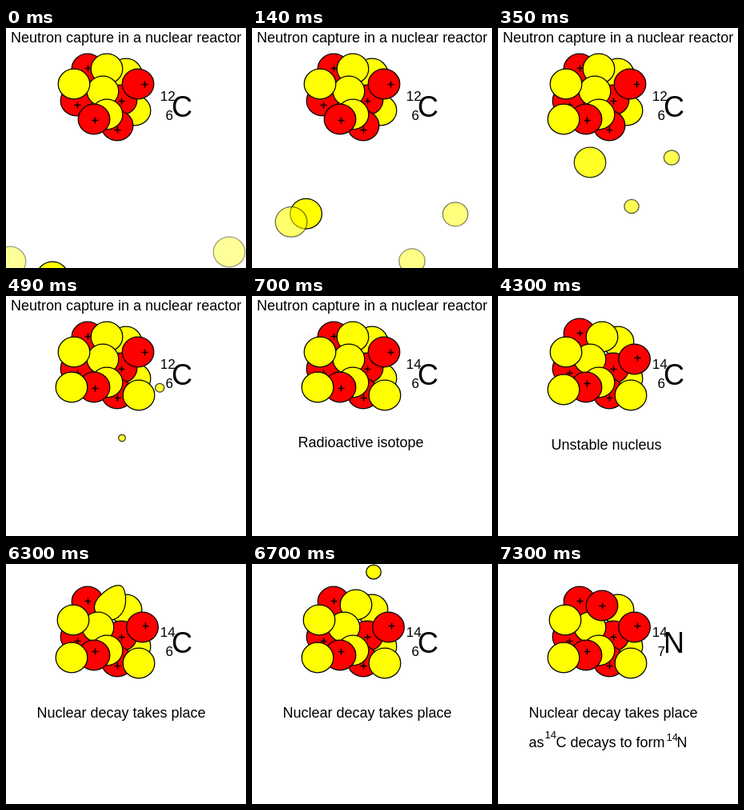
An HTML page with a canvas that plays this animation: 300x300 px, repeating every 8000 ms.

```html
<!DOCTYPE html>
<html lang="en">
<head>
<meta charset="utf-8">
<title>Neutron capture</title>
<style>
html, body { margin: 0; width: 100%; height: 100%; overflow: hidden; background: #fff; }
canvas { display: block; width: 300px; height: 300px; }
</style>
</head>
<body>
<canvas id="stage" width="300" height="300"></canvas>
<script>
const ctx = document.getElementById('stage').getContext('2d');
const LOOP = 8000, STEP = 70;
const RED = '#f00', YELLOW = '#ff0';
const FONT = '"Liberation Sans", Arial, sans-serif';

// Back to front: x, y and, for protons, the place of the plus sign.
const calm = {
  p1: [102, 51, 102, 50],
  n1: [150, 57],
  p2: [88, 91, 89, 96],
  n2: [161, 103],
  p3: [144, 90, 144, 91],
  p4: [139, 122, 139, 127],
  n5: [126, 51],
  n3: [121, 79],
  n4: [126, 108],
  p5: [110, 114, 111, 115],
  n6: [85, 70],
  p6: [165, 70, 173, 70],
  left: [82, 114],
  right: [166, 124]
};
const unstable = {
  ...calm,
  p1: [102, 47, 102, 46],
  n3: [115, 79],
  p5: [110, 114, 111, 109],
  n5: [130, 51],
  p6: [170.5, 79, 174, 77],
  left: [82, 117]
};
const shakeA = { ...unstable, p1: [102, 50, 102, 49], n3: [118, 79], left: [80, 115], right: [166, 121] };
const shakeB = { ...unstable, n5: [127, 50], p6: [168, 75, 173, 74], left: [81, 113], right: [165, 122] };
const decaying = { ...unstable, n6: [84, 70] };
const shakeC = { ...decaying, p6: [169, 77, 173, 75], left: [81, 116], right: [165, 122] };

function ball(x, y, color, scale = 1, alpha = 1) {
  if (scale <= 0.02 || alpha <= 0) return;
  ctx.globalAlpha = alpha;
  ctx.beginPath();
  ctx.ellipse(x, y, 19.8 * scale, 18.8 * scale, 0, 0, Math.PI * 2);
  paint(color);
  ctx.globalAlpha = 1;
}

function paint(color) {
  ctx.fillStyle = color;
  ctx.fill();
  ctx.strokeStyle = '#000';
  ctx.lineWidth = 1.25;
  ctx.stroke();
}

function proton(x, y, px = x, py = y) {
  ball(x, y, RED);
  ctx.fillStyle = '#000';
  ctx.fillRect(px - 3.5, py - 0.25, 8, 1.5);
  ctx.fillRect(px - 0.25, py - 3.5, 1.5, 8);
}

// A neutron pulled out towards the upper right.
function bulge(pull) {
  const x = 141 + pull, y = 26.6 - pull;
  ctx.beginPath();
  ctx.moveTo(110.5, 53);
  ctx.bezierCurveTo(111, 42, 130, 26.6 - pull, x, y);
  ctx.bezierCurveTo(x + 7, y, 150, 38, 149.5, 47);
  ctx.bezierCurveTo(149, 60, 140, 70, 130, 70);
  ctx.bezierCurveTo(118, 70, 110, 63, 110.5, 53);
  ctx.closePath();
  paint(YELLOW);
}

function text(str, x, y, size = 18) {
  ctx.font = size + 'px ' + FONT;
  ctx.fillStyle = '#000';
  ctx.fillText(str, x, y);
}

function symbol(mass, number, letter) {
  text(mass, 192.7, 91, 17);
  text(number, 199.5, 114.5, 17);
  text(letter, 207, 111, 36);
}

function nucleus(pose, t) {
  const changed = t >= 6900;
  for (const [name, spot] of Object.entries(pose)) {
    if (t < 700 && (name === 'left' || name === 'right')) continue;
    if (name === 'n5' && changed) continue;
    if (name === 'n5' && t >= 6300 && t < 6700) bulge(t < 6500 ? 0 : 4);
    else if (name[0] === 'p') proton(...spot);
    else ball(spot[0], spot[1], YELLOW);
  }
  if (changed) proton(130, 52);
}

// Straight flight between [x, y, scale, alpha] points, k beyond 1 runs on.
function fly(a, b, k) {
  const [x, y, s, o] = a.map((v, i) => v + (b[i] - v) * k);
  ball(x, y, YELLOW, s, Math.min(1, o));
}

function flight(t) {
  const n = Math.floor(t / STEP);
  fly([279, 280, 1, 0.4], [217, 162, 0.49, 0.67], n / 5);
  if (n > 0) fly([211, 314, 0.94, 0.4], [167, 223, 0.46, 0.67], (n - 1) / 4);
  nucleus(calm, t);
  fly([58, 311, 1, 1], [82, 114, 1, 1], Math.min(1, n / 5));
  if (n <= 5) fly([5, 292, 1, 0.4], [115, 168, 1, 0.85], n / 5);
  else fly([115, 168, 1, 0.85], [166, 124, 1, 1], Math.min(1, (n - 5) / 2));
}

function poseAt(t) {
  if (t < 3900) return calm;
  if (t < 4100) return shakeA;
  if (t < 4300) return shakeB;
  if (t < 6300) return unstable;
  return t >= 6500 && t < 6700 ? shakeC : decaying;
}

function captions(t) {
  if (t < 3700) text('Neutron capture in a nuclear reactor', 6, 18);
  if (t >= 700 && t < 3700) text('Radioactive isotope', 57.5, 189);
  if (t >= 3700 && t < 6300) text('Unstable nucleus', 66.5, 192);
  if (t >= 6300) text('Nuclear decay takes place', 38.5, 192);
  if (t >= 7300) {
    text('as', 38.5, 229);
    text('14', 58.5, 218, 13);
    text('C decays to form', 72.5, 229);
    text('14', 210.5, 221, 13);
    text('N', 223.5, 229);
  }
  if (t < 700) symbol('12', '6', 'C');
  else if (t < 7100) symbol('14', '6', 'C');
  else symbol('14', '7', 'N');
}

function draw(t) {
  ctx.fillStyle = '#fff';
  ctx.fillRect(0, 0, 300, 300);
  if (t < 700) flight(t);
  else nucleus(poseAt(t), t);
  if (t >= 6700 && t < 6900) ball(152, 10, YELLOW, 0.47);
  if (t >= 6900 && t < 7100) ball(171.5, 3, YELLOW, 0.47);
  captions(t);
}

const start = performance.now();
function tick() {
  draw((performance.now() - start) % LOOP);
  requestAnimationFrame(tick);
}
tick();
</script>
</body>
</html>
```
